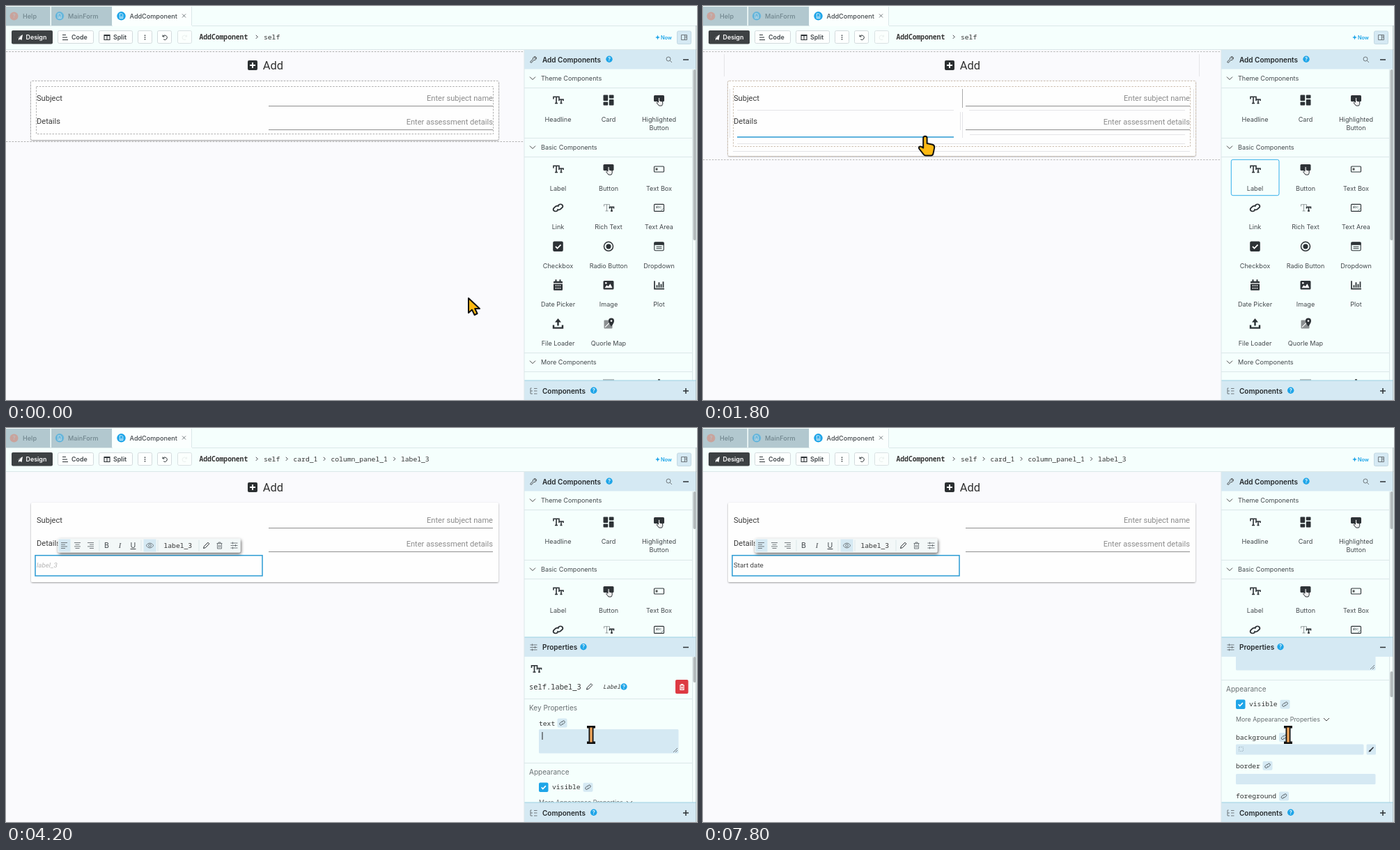
Animation, 992 px wide and 565 px high, one loop 8000 ms. Source, as an HTML page:

```html
<!DOCTYPE html>
<html lang="en">
<head>
<meta charset="utf-8">
<title>Form designer</title>
<style>
html, body { margin: 0; width: 100%; height: 100%; overflow: hidden; background: #fafafd; }
svg { display: block; width: 100vw; height: 100vh; }
text { font: 9.1px Inter, sans-serif; fill: #44494d; white-space: pre; }
.mid { text-anchor: middle; }
.end { text-anchor: end; }
.head { font-size: 10px; font-weight: 600; fill: #24292c; }
.btn { font-size: 8.9px; font-weight: 600; }
.tab { font-weight: 500; }
.group { font-size: 10px; fill: #6a7073; }
.form { font: 11.1px Roboto, sans-serif; fill: #3c3c3c; }
.hint { fill: #8b8b8b; }
.title { font: 16.5px Roboto, sans-serif; fill: #333; }
.small { font: 9.8px Roboto, sans-serif; fill: #444; }
.mono { font: 500 9.7px "Noto Sans Mono", monospace; fill: #333; }
.line { fill: none; stroke: #2d3236; stroke-width: 1.1; }
.thin { fill: none; stroke: #666d71; stroke-width: .9; }
.solid { fill: #2d3236; }
.white { fill: none; stroke: #fff; stroke-width: 1.3; }
.rule { fill: none; stroke: #dbe7e9; }
.dash { fill: none; stroke: #b0b0b0; stroke-dasharray: 2.5 1.8; }
.dragging .dash { stroke: #cdbfb0; }
.dragging .edge { stroke: #b8b8b8; }
.guide { fill: none; stroke: #e4e4e7; }
.cursor path { stroke: #111; stroke-linejoin: round; }
</style>
</head>
<body>
<svg id="stage" viewBox="0 0 992 565" preserveAspectRatio="none"></svg>
<script>
const MINT = '#f5fffd', PALE = '#d5e9f3', BLUE = '#1ea5e8', DARK = '#2d3236';

const text = (x, y, s, cls = '', more = '') => `<text x="${x}" y="${y}" class="${cls}" ${more}>${s}</text>`;
const rect = (x, y, w, h, fill, more = '') =>
  `<rect x="${x}" y="${y}" width="${w}" height="${h}" fill="${fill}" ${more}/>`;
const path = (d, x = 0, y = 0, cls = 'line', more = '') =>
  `<path d="${d}" transform="translate(${x} ${y})" class="${cls}" ${more}/>`;
const group = (id, body, more = '') => `<g id="${id}" ${more}>${body}</g>`;
const at = (x, y, body, more = '') => `<g transform="translate(${x} ${y})" ${more}>${body}</g>`;
const hline = (x1, x2, y, cls = 'rule', more = '') => path(`M${x1} ${y}H${x2}`, 0, 0, cls, more);
const help = (x, y) => `<circle cx="${x}" cy="${y}" r="4.7" fill="${BLUE}"/>` +
  text(x, y + 2.7, '?', 'mid', 'style="font-size:7.5px;font-weight:600;fill:#fff"');
const chevron = (x, y) => path('M-4-2L0 2L4-2', x, y, 'thin', 'style="stroke:#333"');
const crumbArrow = x => path('M-1.2-2.5L1.3 0L-1.2 2.5', x, 44.3, 'line', 'style="stroke-width:.9"');

// Icons, each centred on the origin
const pencil = path('M-4 4l.9-3L2.5-4.3l1.8 1.8L-1 3.1z', 0, 0, 'line', 'style="stroke-width:1"');
const bin = cls => path('M-4-3H4M-1.5-3v-1.5h3V-3M-3-3v7.5H3V-3M-1-1v4M1-1v4', 0, 0, cls);
const sliders = path('M-5-3.5H5M-5 0H5M-5 3.5H5M-2-5v3M2-1.5v3M-2 2v3', 0, 0, 'thin');
const chainPath = 'M-1 1.8a2.6 2.6 0 0 0 3.7 0l2-2a2.6 2.6 0 0 0-3.7-3.7l-1 1M1-1.8a2.6 2.6 0 0 0-3.7 0l-2 2a2.6 2.6 0 0 0 3.7 3.7l1-1';
const chain = `<g transform="scale(1.25 1.1)">${path(chainPath, 0, 0, 'line', 'style="stroke-width:1.5"')}</g>`;
const chip = (x, y) => rect(x - 7, y - 6.5, 14, 13, PALE, 'rx="2"') +
  at(x, y, `<g transform="scale(.68)">${path(chainPath)}</g>`);
const letters = path('M-6.5-1.5V-4.7H1.5V-1.5M-2.5-4.7V4.5M-4.5 4.5h4M1.5 1V-1H7.5V1M4.5-1V4.5M3 4.5h3', 0, 0, 'line', 'style="stroke-width:1.6"');
const press = rect(-7.5, -7, 15, 9, DARK, 'rx="1.5"') +
  path('M-1 3V-2.5a1.1 1.1 0 0 1 2.2 0V1l4 1v3.5L4 8H0L-3.5 3.7l1-1z', 0, 0, 'line', 'style="fill:#eee;stroke-width:1"');
const ICONS = {
  letters, press, chain,
  card: rect(-7.5, -7.5, 6.7, 8.5, DARK, 'rx="1"') + rect(.8, -7.5, 6.7, 5, DARK, 'rx="1"') +
    rect(-7.5, 2.5, 6.7, 5, DARK, 'rx="1"') + rect(.8, -1, 6.7, 8.5, DARK, 'rx="1"'),
  box: rect(-7, -4, 14, 8, 'none', 'class="line" rx="1"') + rect(-5, -1.5, 3, 3, '#555'),
  rich: `<g opacity=".75">${path('M-6.5-2V-4.7H1.5V-2M-2.5-4.7V4.5M-4.5 4.5h4', 0, 0, 'thin')}</g>` +
    path('M1.5 1V-1H7.5V1M4.5-1V4.5M3 4.5h3', 0, 0, 'line', 'style="stroke-width:1.6"'),
  area: rect(-7, -5, 14, 10, 'none', 'class="line" rx="1"') + text(-5, 1, 'abc', '', 'style="font-size:5px"') + path('M3 4L6 1', 0, 0, 'thin'),
  check: rect(-7.3, -7.3, 14.6, 14.6, DARK, 'rx="2"') + path('M-3.5 0L-1 2.7L4-2.5', 0, 0, 'white', 'style="stroke-width:1.8"'),
  radio: `<circle r="6.5" class="line" style="stroke-width:1.5"/><circle r="3.6" class="solid"/>`,
  drop: rect(-6.7, -6, 13.4, 12, 'none', 'class="line" rx="1.5"') + rect(-7, -6, 14, 4, DARK) + path('M-4 .5H4M-4 3H4'),
  date: rect(-6.5, -5.5, 13, 13, DARK, 'rx="1"') + path('M-3-8v4M3-8v4', 0, 0, 'line', 'style="stroke-width:2"') +
    path('M-6.5-2.3h13', 0, 0, 'white') + path('M-4 1H4M-4 4.5H4', 0, 0, 'white', 'stroke-dasharray="2 1"'),
  image: rect(-7.5, -6.3, 15, 12.6, DARK, 'rx="1.5"') + path('M-5.5 4L-2.5 0L-.5 2L2.5-2L5.5 4z', 0, 0, '', 'fill="#fff"') +
    '<circle cx="-3.7" cy="-3" r="1.3" fill="#fff"/>',
  plot: path('M-6.5-6V5.5H7.5', 0, 0, 'line', 'style="stroke-width:1.7"') + path('M-3 3.5V0M0 3.5V-4M3 3.5V-1.5M6 3.5V-5', 0, 0, 'line', 'style="stroke-width:1.8"'),
  load: path('M-1.2 3V-2H-4.5L0-7.5L4.5-2H1.2V3z', 0, 0, 'solid') + path('M-6.5 2V6H6.5V2', 0, 0, 'line', 'style="stroke-width:2.4"'),
  map: rect(-6.5, -5, 12, 12, '#8b8f91', 'rx="1"') + path('M-5 5L4-4', 0, 0, 'white') +
    path('M4 4Q0-1 0-4a4 4 0 0 1 8 0Q8-1 4 4z', 0, 0, 'solid') + '<circle cx="4" cy="-4" r="1.3" fill="#fff"/>'
};

const COLUMNS = [792.5, 865, 937.5];
const BASIC = [
  ['letters', 'Label'], ['press', 'Button'], ['box', 'Text Box'],
  ['chain', 'Link'], ['rich', 'Rich Text'], ['area', 'Text Area'],
  ['check', 'Checkbox'], ['radio', 'Radio Button'], ['drop', 'Dropdown'],
  ['date', 'Date Picker'], ['image', 'Image'], ['plot', 'Plot'],
  ['load', 'File Loader'], ['map', 'Quorle Map']
];
const tool = (icon, label, x, y, gap = 31) => at(x, y, ICONS[icon]) + text(x, y + gap, label, 'mid');
const section = (label, y) => chevron(756, y) + text(768, y + 3.3, label) + hline(744, 986, Math.round(y + 13.4) + .5);

const topBar = () => {
  const page = x => `<circle cx="${x}" cy="14.3" r="6.2" fill="${BLUE}"/>` +
    path('M-2.3-3.3H1L2.3-2V3.3H-2.3zM-1 .5H1M-1 2H1', x, 14.3, 'white', 'style="stroke-width:.8"');
  const button = (x, w, more = '') => rect(x + .5, 35.5, w - 1, 18, '#fdfffe', `rx="2" stroke="#d3dadd" ${more}`);
  return rect(0, 0, 992, 63, MINT) + hline(0, 992, 28.5) + hline(0, 992, 62.5) +
    rect(0, 1, 63.5, 27, '#b2c8cf') + rect(65, 1, 87, 27, '#b2c8cf') + rect(153, 1, 114, 28, '#fbfffe') +
    path('M266.5 1V28', 0, 0, 'rule') +
    '<circle cx="11.5" cy="14.5" r="6" fill="#c9a39c"/>' + text(11.5, 17.3, '?', 'mid', 'style="font-size:8px;fill:#b2c8cf"') +
    text(24, 17.5, 'Help', 'tab', 'style="fill:#71868e"') +
    `<g opacity=".5">${page(77)}</g>` + text(89, 17.5, 'MainForm', 'tab', 'style="fill:#71868e"') +
    page(165.5) + text(177.5, 17.5, 'AddComponent', 'tab') + path('M-2.5-2.5l5 5M2.5-2.5l-5 5', 255.5, 14, 'thin') +
    rect(8, 35, 59, 19.5, '#3d4143', 'rx="2"') + path('M-4 1L4-4L2.5 4L-.5 2.5L-2 4.5V1.5L2-2', 20, 45, '', 'fill="#fff"') +
    text(28.5, 48, 'Design', 'btn', 'style="fill:#fff"') +
    button(74, 52) + path('M-4-3.5H1M-4 0H3M-4 3.5H4', 85, 45) + text(94, 48, 'Code', 'btn') +
    button(133, 49) + path('M-4-3.5H4V3.5H-4zM0-3.5V3.5M-4-2.5H4', 145, 45) + text(154, 48, 'Split', 'btn') +
    button(189, 21) + path('M0-3.5v1.4M0-.7v1.4M0 2.1v1.4', 199.5, 45, 'line', 'style="stroke-width:1.4"') +
    button(217, 21) + path('M-3-3.5V-1H-.5M-2.8-1.2A3.2 3.2 0 1 1-1.8 2.8', 228, 45, 'line', 'style="stroke-width:1"') +
    button(246, 21, 'opacity=".8"') + path('M3-3.5V-1H.5M2.8-1.2A3.2 3.2 0 1 0 1.8 2.8', 256.5, 45, 'line', 'opacity=".07"') +
    text(277.5, 48, 'AddComponent', 'mono', 'style="font-weight:700"') + crumbArrow(360) +
    text(370, 48, 'self', 'mono') +
    group('crumbs', [['card_1', 412.5], ['column_panel_1', 466.5], ['label_3', 567]].map(([name, x]) =>
      crumbArrow(x - 9.5) + text(x, 48, name, 'mono')).join('')) +
    path('M0-3.4L.9-.9L3.4 0L.9.9L0 3.4L-.9.9L-3.4 0L-.9-.9z', 935.5, 45, '', `fill="${BLUE}"`) +
    text(940, 47.7, 'Now', '', `style="font-size:7.3px;font-weight:600;fill:${BLUE}"`) +
    rect(963.5, 36, 20, 18.5, PALE, 'rx="2" stroke="#c3d9e3"') + path('M-4-3.5H4V3.5H-4zM1-3.5V3.5M2-1.5H3.5M2 .5H3.5', 973.5, 45, 'thin');
};

const floatBar = () => {
  const aligned = (x, shift) => path(`M${-4.5}-4H4.5M${-4.5 + shift}-1.3h6M-4.5 1.4H4.5M${-4.5 + shift} 4h6`, x, 10, 'thin');
  const mark = (x, s, style) => text(x, 13.5, s, 'mid', `style="font-size:10.5px;${style}"`);
  return rect(0, 0, 262, 20, '#f3f8f8', 'rx="2" filter="url(#deep)"') +
    rect(1, 1, 17, 18, PALE) + rect(123, 1, 18, 18, PALE) +
    aligned(9, 0) + aligned(28, 1.5) + aligned(47, 3) +
    mark(70, 'B', '') + mark(89, 'I', 'font-style:italic;font-family:Liberation Serif,serif') + mark(108, 'U', 'text-decoration:underline') +
    path('M-5.5 0Q0-7 5.5 0Q0 7-5.5 0z', 132, 10, 'thin') + '<circle cx="132" cy="10" r="1.8" class="thin"/>' +
    text(152, 13.5, 'label_3', 'mono') + at(213, 10, pencil) + at(232, 10, bin('thin')) + at(253, 10, sliders) +
    [59.5, 119.5, 143.5, 202.5].map(x => path(`M${x} 2V18`, 0, 0, 'rule')).join('');
};

const designer = () => rect(0, 63, 744, 502, '#fafafd') +
  rect(36, 107, 671, 85, '#fefefe', 'id="card" rx="2" filter="url(#soft)"') +
  group('dashes', hline(0, 744, 65.5, 'dash edge') + hline(0, 744, 0, 'dash edge', 'id="formEnd"') +
    rect(35.5, 107.5, 672, 85, 'none', 'id="cardDash" class="dash" rx="2"') +
    rect(43.5, 115.5, 656, 68, 'none', 'id="innerDash" class="dash"')) +
  rect(347, 78, 14, 14, '#2b2f31', 'rx="2"') + path('M-4 0H4M0-4V4', 354, 85, 'white', 'style="stroke-width:2"') +
  text(368.8, 91, 'Add', 'title') +
  [['Subject', 'Enter subject name', 136, 143.5], ['Details', 'Enter assessment details', 169.5, 177.5]].map(([name, hint, y, under]) =>
    text(44, y - .3, name, 'form') + text(699, y, hint, 'form hint end') +
    hline(377, 699, under, '', 'stroke="#8f8f8f"')).join('') +
  group('guides', path('M30.5 69V101M712.5 69V101M38.5 119V189M704.5 119V189M369.5 152V178M372.5 152V189M49 149.5H360M382 149.5H692M383 184.5H692M49 197.5H692M43 208.5H699', 0, 0, 'guide') +
    path('M372.5 119V146', 0, 0, 'guide', 'style="stroke:#aaa"') + rect(49, 187.2, 311, 1.5, '#2b9bd3')) +
  group('dropped', rect(42, 182.7, 326, 29.3, '#fefefe', 'stroke="#2b9bd3" stroke-width="1.5"') +
    text(44, 200.2, '', 'small', 'id="labelText"') + group('floatBar', floatBar()));

const palette = () => rect(744, 63, 248, 502, MINT) + rect(744, 63, 247, 27.5, PALE) +
  path('M-4.5 3L-.5-.8a3 3 0 0 1 3.7-3.5L1.7-2.5L2.6-1.6L4.4-3.2a3 3 0 0 1-3.6 3.7L-3 4.5z', 757, 77, 'thin', 'style="stroke:#333"') +
  text(770, 80.6, 'Add Components', 'head') + help(866, 76.3) +
  '<circle cx="951" cy="76" r="3" class="thin"/>' + path('M953.3 78.3l2.7 2.7', 0, 0, 'thin') + hline(972, 980, 77, 'line', 'style="stroke-width:1.5"') +
  section('Theme Components', 103.6) + tool('letters', 'Headline', COLUMNS[0], 135) + tool('card', 'Card', COLUMNS[1], 135) +
  tool('press', 'Highlighted', COLUMNS[2], 135) + text(COLUMNS[2], 178, 'Button', 'mid') + hline(744, 986, 189.5) +
  section('Basic Components', 202.6) +
  rect(758.3, 220.3, 68.7, 51.4, PALE, `id="picked" rx="2.5" stroke="${BLUE}" stroke-width=".9"`) +
  BASIC.map(([icon, label], i) => tool(icon, label, COLUMNS[i % 3], 234 + 55.4 * Math.floor(i / 3))).join('') +
  hline(744, 986, 497.5) + section('More Components', 510.7) +
  hline(857, 873, 536, 'thin') + rect(936, 535, 3, 2, '#555') +
  path('M985.5 91V537', 0, 0, 'rule') + rect(986.5, 91, 4, 245, '#b3babc', 'id="paletteThumb" rx="2"');

const properties = () => {
  const field = (x, y, w, h) => rect(x, y, w, h, PALE, 'rx="1.5"');
  const body = group('typeIcon', at(761, 345.5, letters)) +
    text(751, 374.7, 'self.label_3', 'mono', 'style="font-size:10.4px;font-weight:400"') + at(837.5, 371, pencil) +
    text(857, 374, 'Label', 'mono', 'style="font-size:8.4px;font-style:italic"') + help(887, 371) +
    rect(961, 361, 18.5, 20, '#dd3a43', 'rx="2"') + at(970.5, 371.5, `<g transform="scale(.85)">${bin('white')}</g>`) +
    hline(744, 986, 388.5) + text(751, 404.5, 'Key Properties', 'group') +
    text(765, 426.5, 'text', 'mono') + chip(798.5, 423) + field(765, 432, 200.5, 34.5) +
    path('M964 459l-6 6M964 462l-3 3', 0, 0, 'thin') +
    text(769.5, 444.8, '', '', 'id="entry" style="font-size:8.6px"') + rect(0, 436, 1, 11, '#222', 'id="caret"') +
    hline(744, 986, 480.5) + text(751, 496.7, 'Appearance', 'group') +
    rect(765, 508.5, 13.5, 13.5, BLUE, 'rx="2"') + path('M-3 0L-1 2.2L3.2-2.2', 771.7, 515.3, 'white', 'style="stroke-width:1.6"') +
    text(784, 518.3, 'visible', 'mono') + chip(835.5, 515.2) +
    text(765, 540.2, 'More Appearance Properties', '', 'style="font-size:8.9px;fill:#6a7073"') + chevron(895, 537) +
    text(765, 566, 'background', 'mono') + chip(834, 562.5) + field(765, 572.5, 183.5, 15) +
    rect(769.5, 576.5, 6, 6, 'none', 'stroke="#a6bbc6" stroke-dasharray="1.5 1"') +
    field(952.5, 572.5, 13.5, 15) + path('M-3.5 3.5Q-3 .5-1 .3L3-3.7L4-2.7L.3 1.3Q0 3.5-3.5 3.5z', 959, 580, 'solid') +
    text(765, 607, 'border', 'mono') + chip(810.5, 603.3) + field(765, 615, 200.5, 15) +
    text(765, 650.3, 'foreground', 'mono') + chip(834, 647);
  return rect(744, 300, 247, 237, MINT) + rect(744, 300, 247, 28, PALE) + hline(744, 991, 300, '', 'stroke="#9cd0e2"') +
    at(757.5, 314.5, sliders) + text(770, 317.8, 'Properties', 'head') + help(829, 313.7) +
    hline(972, 980, 314.5, 'line', 'style="stroke-width:1.5"') +
    `<g clip-path="url(#pane)">${group('scroller', body)}</g>` +
    path('M985.5 328V537', 0, 0, 'rule') + rect(986.5, 328, 4, 37, '#b3babc', 'id="paneThumb" rx="2"');
};

const footer = () => rect(744, 537, 247, 28, PALE) + hline(744, 991, 537, '', 'stroke="#9cd0e2"') +
  path('M-4.5-4V4H-1.5M-4.5 0H-1.5M-4.5-4H-3M.5-3.5H5M.5 0H5M.5 4H5', 757.5, 552, 'thin') +
  text(770, 555.6, 'Components', 'head') + help(843.7, 551.3) + path('M-4 0H4M0-4V4', 976, 552, 'line', 'style="stroke-width:1.5"') +
  path('M744 63V565', 0, 0, 'rule') + path('M990.8 28V565', 0, 0, '', 'stroke="#a9b4b7"');

const cursors = {
  arrow: '<path d="M0 1V22L5 17.6L8.6 25L12.6 23L9.2 16H16z" fill="#fdb913" stroke-width="2"/>',
  hand: '<path d="M-2.8 2.5a2.7 2.7 0 0 1 5.4 0V10l8 1.8q3 1 2.6 4.3l-1.6 8q-.6 3.5-3.6 3.5H1q-2 0-3.5-2l-6-7.6q-1.5-2.6 1-3.5q2-.4 4.7 2z" fill="#fdb913" stroke-width="2"/>',
  ibeam: '<path d="M-6-11.2H6M-6 11.2H6" stroke-width="3.6"/><path d="M0-11V11" stroke-width="7"/><path d="M0-10.5V10.5" style="stroke:#f0a65c" stroke-width="3.4"/>',
  resize: '<path d="M-1.6-12V12M1.8-12V12M-14 0H-5M14 0H5M-9.5-4.5L-14 0L-9.5 4.5M9.5-4.5L14 0L9.5 4.5" fill="none" stroke-width="2"/>'
};

const stage = document.getElementById('stage');
stage.innerHTML = `<defs>
  <filter id="soft" x="-5%" y="-10%" width="110%" height="125%"><feDropShadow dx="0" dy="1" stdDeviation="1" flood-opacity=".38"/></filter>
  <filter id="deep" x="-5%" y="-40%" width="110%" height="200%"><feDropShadow dx="1" dy="2" stdDeviation="2" flood-opacity=".65"/></filter>
  <clipPath id="pane"><rect x="744" y="328" width="242" height="209"/></clipPath></defs>` +
  designer() + topBar() + palette() + group('properties', properties()) + footer() +
  Object.keys(cursors).map(kind => group(kind, cursors[kind], 'class="cursor"')).join('');

const $ = id => document.getElementById(id);
const set = (id, name, value) => $(id).setAttribute(name, value);
const show = (id, on) => { $(id).style.display = on ? '' : 'none'; };

const LOOP = 8000, STEP = 200;
const POINTER = [
  [0, 664, 418], [200, 670, 408], [800, 785, 258], [1000, 794, 242], [1200, 790, 243], [1400, 741, 241],
  [1600, 510, 208], [1800, 319, 187], [2200, 270, 187], [2600, 263, 187], [2800, 340, 215],
  [3200, 803, 409], [3400, 824, 432], [3800, 840, 440]
];
const KINDS = [[0, 'arrow'], [1000, 'hand'], [1400, 'resize'], [1600, 'hand'], [3000, 'arrow'], [3400, 'ibeam']];
const TYPED = [[0, ''], [4800, 'S'], [5000, 'St'], [5200, 'Star'], [5400, 'Start'], [5600, 'Start '],
  [6200, 'Start d'], [6400, 'Start da'], [6600, 'Start dat'], [6800, 'Start date']];
const SCROLL = [[7000, 0], [7200, 16], [7400, 56], [7600, 100], [7800, 119]];

const latest = (keys, t) => keys.filter(k => k[0] <= t).pop()[1];
function between(keys, t) {
  const i = keys.findIndex(k => k[0] > t);
  if (i < 0) return keys[keys.length - 1].slice(1);
  if (i === 0) return keys[0].slice(1);
  const [a, b] = [keys[i - 1], keys[i]], p = (t - a[0]) / (b[0] - a[0]);
  return a.slice(1).map((v, j) => v + (b[j + 1] - v) * p);
}

function draw(t) {
  const dragging = t >= 1600 && t < 2600, dropped = t >= 2600;
  const [card, inner, form] = dropped ? [221, 212.5, 223.5] : dragging ? [215, 201.5, 220.5] : [192, 183.5, 194.5];
  set('card', 'height', card - 107);
  set('cardDash', 'height', card - 107);
  set('innerDash', 'height', inner - 115.5);
  set('formEnd', 'transform', `translate(0 ${form})`);
  set('dashes', 'class', dragging ? 'dragging' : '');
  show('dashes', t < 3000);
  show('guides', dragging);
  show('dropped', dropped);
  show('crumbs', dropped);
  show('properties', dropped);
  show('picked', t >= 800 && t < 2600);
  set('picked', 'fill', dragging ? MINT : PALE);
  set('floatBar', 'transform', `translate(${t < 2800 ? 175.5 : 74.5} 158.5)`);
  set('typeIcon', 'opacity', t < 2800 ? .25 : 1);
  set('paletteThumb', 'height', dropped ? 54 : 245);

  const typed = latest(TYPED, t), label = $('labelText');
  label.textContent = typed || 'label_3';
  label.style.cssText = typed ? '' : 'font-style:italic;fill:#b5b5b5';
  $('entry').textContent = typed;
  set('caret', 'x', 769.5 + (typed ? $('entry').getComputedTextLength() : 0));
  show('caret', t >= 4000);

  const [scroll] = between(SCROLL, t);
  set('scroller', 'transform', `translate(0 ${-scroll})`);
  set('paneThumb', 'y', 328 + scroll * 21 / 119);

  const kind = latest(KINDS, t), [x, y] = between(POINTER, t);
  for (const name in cursors) show(name, name === kind);
  set(kind, 'transform', `translate(${x} ${y})`);
}

const start = performance.now();
function tick() {
  const t = (performance.now() - start) % LOOP;
  draw(Math.floor(t / STEP) * STEP);
  requestAnimationFrame(tick);
}
tick();
</script>
</body>
</html>
```
